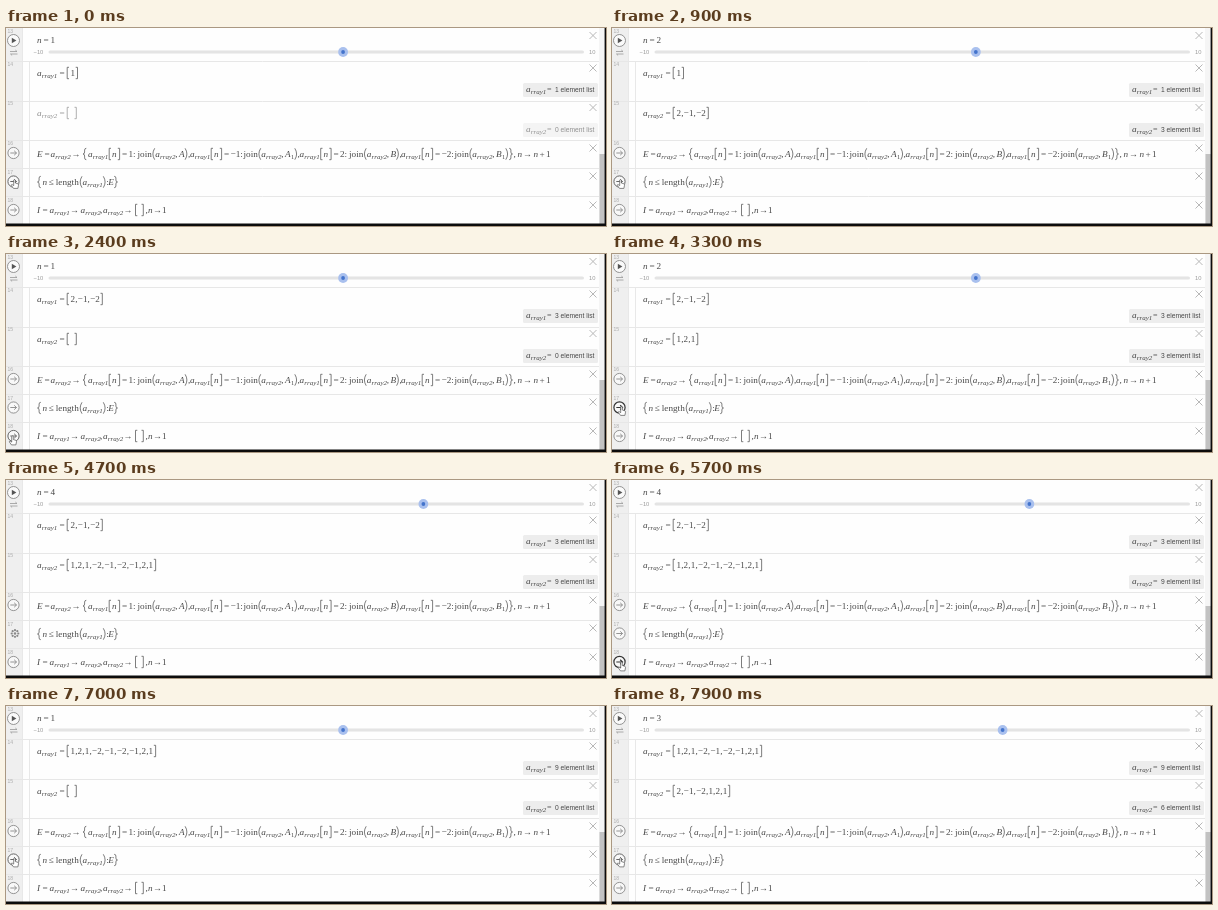
An HTML page for the animation above (8 s loop, 600x198 px).

```html
<!DOCTYPE html>
<html lang="en">
<head>
<meta charset="utf-8">
<title>Array substitution</title>
<style>
  html, body { margin: 0; width: 100%; height: 100%; overflow: hidden; background: #fff; }
  svg { display: block; width: 100%; height: 100%; }
  text { font-family: "Liberation Serif", Times, serif; fill: #484848; white-space: pre; }
  .sans { font-family: "Liberation Sans", Arial, sans-serif; }
</style>
</head>
<body>
<svg id="stage" viewBox="0 0 600 198"></svg>
<script>
const LOOP = 8000, TICK = 100;
const stage = document.getElementById("stage");

function add(tag, attrs, parent = stage) {
  const el = document.createElementNS("http://www.w3.org/2000/svg", tag);
  for (const k in attrs) el.setAttribute(k, attrs[k]);
  parent.appendChild(el);
  return el;
}
function text(x, y, str, size = 9.2, extra = {}, parent = stage) {
  const el = add("text", { x, y, "font-size": size, ...extra }, parent);
  el.textContent = str;
  return el;
}
const italic = { "font-style": "italic" };
const it = (x, y, str, p) => text(x, y, str, 9.2, italic, p);
const arrow = (x, y) => text(x, y, "→", 9);
function arr(x, y, i, p) {
  it(x, y, "a", p);
  text(x + 4.8, y + 2.3, "rray" + i, 7, italic, p);
}

// Thin brackets, 4 wide; closing ones are mirrored
const shapes = {
  "[": "M3 -8.7H1.2V2.7H3",
  "(": "M3.2 -8.7Q-.4 -3 3.2 2.7",
  "{": "M3.8 -8.7q-1.7 0 -1.7 1.8v1.9q0 2 -1.6 2q1.6 0 1.6 2v1.9q0 1.8 1.7 1.8"
};
const mirror = { "]": "[", ")": "(", "}": "{" };
const place = (x, y, str) => `translate(${mirror[str] ? x + 4 : x} ${y})${mirror[str] ? " scale(-1 1)" : ""}`;
const fence = (x, y, str, p) => add("path", {
  d: shapes[mirror[str] || str], transform: place(x, y, str),
  fill: "none", stroke: "#5c5c5c", "stroke-width": .8
}, p);

// Panel
add("rect", { width: 600, height: 198, fill: "#fefefe" });
add("rect", { width: 16, height: 198, fill: "#efefef" });
add("path", { d: "M16.5 0V196M23.5 34V196", stroke: "#e8e8e8" });
[33.5, 73.5, 112.5, 140.5, 168.5].forEach(y =>
  add("path", { d: `M0 ${y}H593`, stroke: "#e7e7e7" }));
add("rect", { x: 593, width: 7, height: 197, fill: "#f5f5f5" });
add("rect", { x: 593.5, y: 126, width: 5.5, height: 70, fill: "#c2c2c2" });
[4, 37, 76, 116, 145, 173].forEach((y, i) =>
  text(1.5, y + 1, 13 + i, 5, { class: "sans", style: "fill:#aaa" }));
[7.5, 40, 79.5, 120, 148, 177].forEach(y =>
  add("path", { d: `M583.5 ${y - 3.5}l7 7m0 -7l-7 7`, stroke: "#b8b8b8", "stroke-width": 1 }));

// Slider row
add("circle", { cx: 7.5, cy: 12.5, r: 6, fill: "#fafafa", stroke: "#888", "stroke-width": .9 });
add("path", { d: "M5.8 9.8l4.6 2.7l-4.6 2.7z", fill: "#555" });
add("path", { d: "M4 23.5h7l-1.6 -1.4M11.5 26h-7l1.6 1.4", fill: "none", stroke: "#999", "stroke-width": .8 });
it(31, 15, "n");
text(37.5, 15, "=");
const nText = text(44.5, 15, "1");
add("rect", { x: 42.5, y: 22.5, width: 535.5, height: 3, rx: 1.5, fill: "#e4e4e4" });
text(27.5, 26, "−10", 5.8, { class: "sans", style: "fill:#999" });
text(583, 26, "10", 5.8, { class: "sans", style: "fill:#999" });
const knob = add("g", {});
add("circle", { cy: 24, r: 4.9, fill: "#a9c0ee" }, knob);
add("circle", { cy: 24, r: 1.9, fill: "#4474cc" }, knob);

// Array rows
function arrayRow(i, y) {
  const g = add("g", {});
  arr(31, y, i, g);
  text(53.5, y, "=", 9.2, {}, g);
  fence(60, y, "[", g);
  const list = text(64.5, y, "", 9.1, { "letter-spacing": .15 }, g);
  const close = fence(0, y, "]", g);
  add("rect", { x: 517, y: y + 7, width: 75, height: 14, rx: 1.5, fill: "#ededed" }, g);
  arr(520, y + 15.5, i, g);
  text(541, y + 15.5, "=", 8, {}, g);
  const count = text(549, y + 16, "", 6.7, { class: "sans" }, g);
  return {
    g,
    show(items) {
      const str = items.join(",").replace(/-/g, "−");
      list.textContent = str;
      const w = [...str].reduce((s, c) => s + .15 + 9.1 * (c === "," ? .25 : c === "−" ? .564 : .5), 0);
      close.setAttribute("transform", place(items.length ? 64 + w : 67.5, y, "]"));
      count.textContent = `${items.length} element list`;
    }
  };
}
const rows = [arrayRow(1, 48), arrayRow(2, 88)];

// Substitution rule
const ey = 129;
it(31, ey, "E");
text(38.5, ey, "=");
arr(44.5, ey, 2);
arrow(65.5, ey);
fence(76.5, ey, "{");
function branch(x, value, name, last) {
  const neg = value < 0, dx = x + (neg ? 4 : 0);
  arr(x, ey, 1);
  fence(x + 20, ey, "[");
  it(x + 24, ey, "n");
  fence(x + 28.8, ey, "]");
  text(x + 34, ey, "=");
  text(x + 40.5, ey, (neg ? "−" : "") + Math.abs(value) + ":");
  text(dx + 49.5, ey, "join");
  fence(dx + 63.5, ey, "(");
  arr(dx + 67.2, ey, 2);
  text(dx + 87.3, ey, ",");
  it(dx + 91, ey, name);
  if (neg) text(dx + 97, ey + 2.3, "1", 6.5);
  const end = dx + (neg ? 100 : 96.3);
  fence(end, ey, ")");
  if (!last) text(end + 3.6, ey, ",");
}
branch(82, 1, "A");
branch(184, -1, "A");
branch(293.5, 2, "B");
branch(395, -2, "B", true);
fence(503, ey, "}");
text(507.5, ey, ",");
it(511.5, ey, "n");
arrow(517, ey);
it(527.5, ey, "n");
text(533.5, ey, "+");
text(540, ey, "1");

// Guard
const gy = 157;
fence(31, gy, "{");
it(36.5, gy, "n");
text(42.5, gy, "≤");
text(49.8, gy, "length");
fence(72.8, gy, "(");
arr(76.5, gy, 1);
fence(96.5, gy, ")");
text(100.3, gy, ":");
it(102.3, gy, "E");
fence(108, gy, "}");

// Reset
const ry = 185;
it(31, ry, "I");
text(36.5, ry, "=");
arr(43.5, ry, 1);
arrow(64, ry);
arr(74.5, ry, 2);
text(94, ry, ",");
arr(97, ry, 2);
arrow(117.5, ry);
fence(128.3, ry, "[");
fence(134.5, ry, "]");
text(139.5, ry, ",");
it(142, ry, "n");
arrow(147, ry);
text(156, ry, "1");

// Run buttons
const buttons = [125, 153.5, 182].map(y => {
  const g = add("g", { transform: `translate(7.5 ${y})`, fill: "none" });
  add("circle", { r: 5.6, fill: "#f8f8f8" }, g);
  add("path", { d: "M-3.2 0H3M.7 -2.2L3 0L.7 2.2" }, g);
  return g;
});
const gear = add("g", { transform: "translate(9 153.5)", fill: "#888" });
for (let i = 0; i < 8; i++)
  add("circle", { cx: 3.3 * Math.cos(i * Math.PI / 4), cy: 3.3 * Math.sin(i * Math.PI / 4), r: 1.1 }, gear);
add("circle", { r: 1.2 }, gear);

const hand = add("path", {
  d: "M-.8 0Q0 -1 .8 0V3L3.4 3.8Q4.2 4.2 4 5.2L3.4 8.4H-1L-3.2 5.4Q-3.2 4.2 -2 4.8L-.8 5.6Z",
  fill: "#fff", stroke: "#555", "stroke-width": .7
});
add("path", { d: "M0 195.4H598.6V0H600V198H0Z", fill: "#0c0c0c" });

// Steps: "run" appends the image of the nth element, "reset" moves the result back
const steps = [[600, "run"], [1800, "reset"], [3200, "run"], [3900, "run"], [4700, "run"],
  [5800, "reset"], [7300, "run"], [7800, "run"]];
const images = { "1": [2, -1, -2], "-1": [-2, -1, -2], "2": [1, 2, 1], "-2": [-1, 2, 1] };
function stateAt(t) {
  let n = 1, a = [1], b = [];
  for (const [at, kind] of steps) {
    if (t < at) break;
    if (kind === "reset") { a = b; b = []; n = 1; }
    else b = b.concat(images[a[n++ - 1]]);
  }
  return { n, a, b };
}

// Pointer path: time, x, y
const path = [[0, 8.5, 152], [900, 8.5, 152], [1500, 6.5, 182.5], [2500, 6.5, 182.5], [3000, 9.5, 153],
  [5000, 9.5, 153], [5500, 9.5, 182.5], [5900, 9.5, 182.5], [6400, 8.5, 152.5], [LOOP, 8.5, 152.5]];
function pointerAt(t) {
  const i = path.findIndex(p => p[0] > t);
  const [t0, x0, y0] = path[i - 1], [t1, x1, y1] = path[i];
  const k = (t - t0) / (t1 - t0), e = k * k * (3 - 2 * k);
  return [x0 + (x1 - x0) * e, y0 + (y1 - y0) * e];
}
const within = (t, a, b) => t >= a && t < b;

function draw(t) {
  const { n, a, b } = stateAt(t);
  nText.textContent = n;
  knob.setAttribute("transform", `translate(${310.3 + 26.77 * n} 0)`);
  rows[0].show(a);
  rows[1].show(b);
  rows[1].g.setAttribute("opacity", Math.min(1, .6 + t / 1000));

  const [x, y] = pointerAt(t), showGear = within(t, 4700, 5000);
  hand.setAttribute("transform", `translate(${x} ${y})`);
  hand.setAttribute("visibility", showGear ? "hidden" : "visible");
  gear.setAttribute("visibility", showGear ? "visible" : "hidden");
  const hot = y < 160 ? 1 : y > 176 ? 2 : -1;
  const pressed = within(t, 3200, 3900) || within(t, 5700, 5800);
  buttons.forEach((g, i) => {
    g.setAttribute("stroke", i === hot ? (pressed ? "#333" : "#666") : "#8a8a8a");
    g.setAttribute("stroke-width", i === hot ? (pressed ? 1.2 : 1) : .9);
    g.setAttribute("visibility", i === 1 && showGear ? "hidden" : "visible");
  });
}

const start = performance.now();
function frame() {
  const t = (performance.now() - start) % LOOP;
  draw(Math.floor(t / TICK) * TICK);
  requestAnimationFrame(frame);
}
draw(0);
requestAnimationFrame(frame);
</script>
</body>
</html>
```
